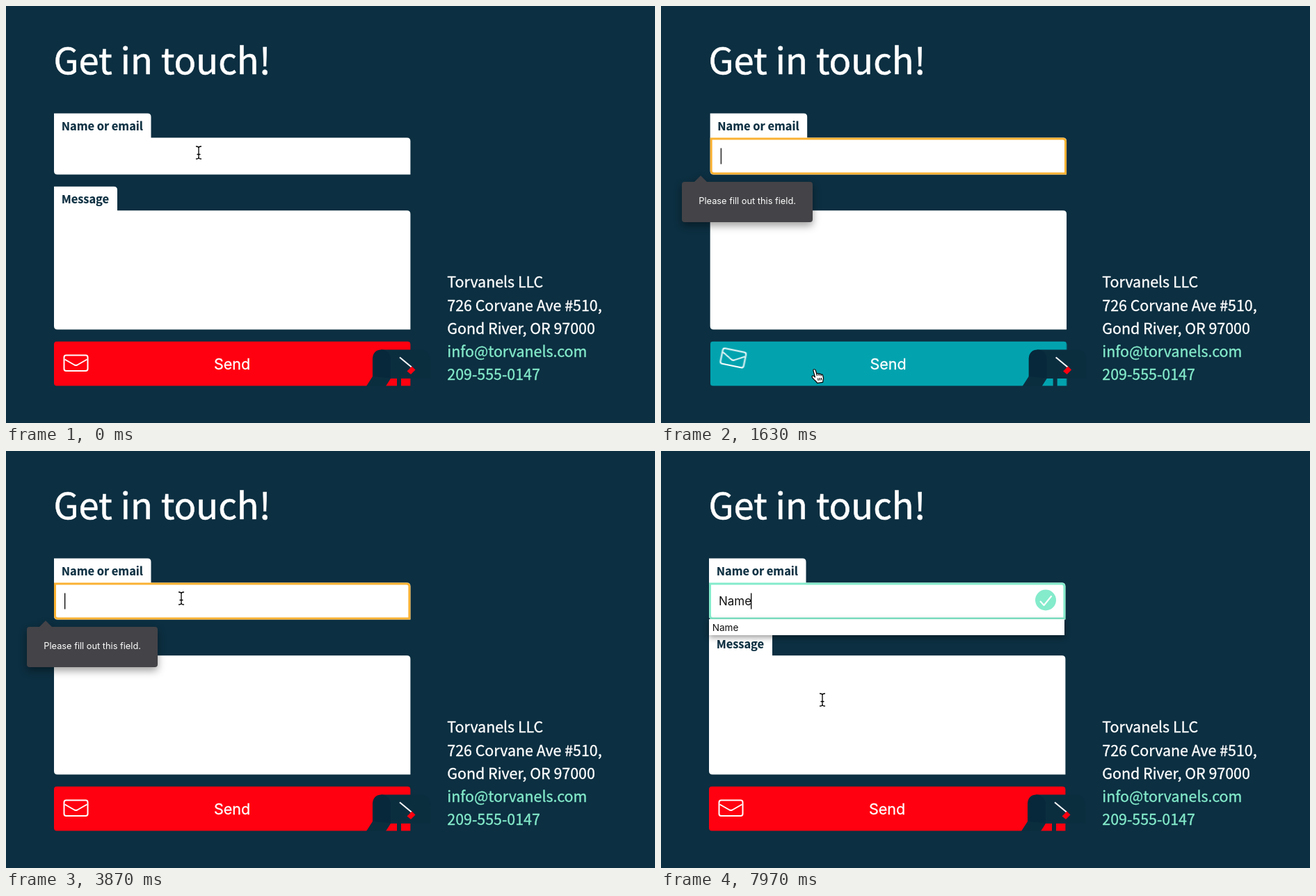
Recreate the animation shown at these times as an HTML page. Size 933 by 600 pixels, loop 8 s.

```html
<!DOCTYPE html>
<html lang="en">
<head>
<meta charset="utf-8">
<title>Contact form</title>
<style>
html, body { margin: 0; width: 100%; height: 100%; overflow: hidden; background: #0c2f41; }
svg { display: block; width: 100vw; height: 100vh; }
text { font-family: "Noto Sans CJK JP", "Noto Sans CJK SC", "Noto Sans", sans-serif; fill: #fff; white-space: pre; }
.title { font-size: 52.4px; stroke: #fff; stroke-width: .6; }
.label { font-size: 16.4px; font-weight: 700; fill: #0c2f41; stroke: #0c2f41; stroke-width: .2; }
.info { font-size: 21.4px; stroke: #fff; stroke-width: .35; }
.link { fill: #84ebcb; stroke: #84ebcb; }
.ui { font-family: Inter, Roboto, sans-serif; }
.send { font-size: 21.5px; text-anchor: middle; stroke: #fff; stroke-width: .3; }
.line { fill: none; stroke: #fff; stroke-width: 2; stroke-linejoin: round; }
.caret { fill: #000; }

/* Every animation shares one 8 s timeline. */
.move, .step { animation: 8s linear infinite; }
.step { animation-timing-function: step-end; }

#form { animation-name: shake; }
@keyframes shake {
  0%, 17.1% { transform: none; }
  17.8%, 18.4% { transform: translateX(1px); }
  19.3% { transform: translateX(-2px); }
  20.3% { transform: translateX(2px); }
  21.3% { transform: translateX(-2px); }
  22.3% { transform: translateX(1px); }
  23.3%, 100% { transform: none; }
}

#button { animation-name: hover; }
@keyframes hover {
  0%, 7.81% { fill: #ff0010; }
  10.5%, 42.29% { fill: #02a3af; }
  44.8%, 100% { fill: #ff0010; }
}

#letter { animation-name: hop; transform-box: fill-box; transform-origin: center; }
@keyframes hop {
  0%, 15% { transform: none; animation-timing-function: ease-out; }
  17.7%, 18.3% { transform: translate(3.2px, -14.5px) rotate(23deg); animation-timing-function: ease-in-out; }
  22.5%, 100% { transform: none; }
}

#focus { animation-name: focus; fill: none; stroke-width: 3; }
@keyframes focus {
  0% { stroke: transparent; }
  17.15% { stroke: #fab131; }
  80.9%, 100% { stroke: #84ebcb; }
}

#blink { animation-name: blink; }
@keyframes blink {
  0%, 23.44%, 35.94%, 48.9%, 60.94%, 73.44%, 80.9%, 100% { opacity: 0; }
  17.19%, 29.69%, 42.19%, 54.69%, 67.19%, 79.69% { opacity: 1; }
}
#blink2 { animation-name: blink2; }
@keyframes blink2 {
  0%, 93.1% { opacity: 0; }
  86.8%, 99.3%, 100% { opacity: 1; }
}

#n, #list { animation-name: key1; }
#a { animation-name: key2; }
#m { animation-name: key3; }
#e { animation-name: key4; }
@keyframes key1 { 0% { fill-opacity: 0; visibility: hidden; } 80.9%, 100% { fill-opacity: 1; visibility: visible; } }
@keyframes key2 { 0% { fill-opacity: 0; } 83.1%, 100% { fill-opacity: 1; } }
@keyframes key3 { 0% { fill-opacity: 0; } 85%, 100% { fill-opacity: 1; } }
@keyframes key4 { 0% { fill-opacity: 0; } 86.8%, 100% { fill-opacity: 1; } }

#list rect { filter: drop-shadow(0 3px 4px rgba(0, 0, 0, .4)); }

#check { animation-name: check; }
@keyframes check {
  0%, 80.9% { opacity: 0; transform: translate(-100px, -1.5px); }
  81%, 82% { opacity: 1; transform: translate(-100px, -1.5px); animation-timing-function: ease-out; }
  86.5%, 100% { opacity: 1; transform: none; }
}

#tip { animation-name: tip; }
#tip path { fill: #444347; filter: drop-shadow(0 5px 6px rgba(0, 0, 0, .38)); }
@keyframes tip {
  0%, 17.1% { opacity: 0; transform: translateY(-2px); }
  17.8%, 18.3% { opacity: .74; transform: translateY(-1px); }
  18.9%, 55% { opacity: 1; transform: none; }
  58.75%, 100% { opacity: 0; transform: none; }
}

#pointer { animation-name: travel; }
@keyframes travel {
  0%, 1.25% { transform: translate(277px, 211px); animation-timing-function: ease-in-out; }
  10%, 29% { transform: translate(221px, 523px); animation-timing-function: ease-in-out; }
  32.4%, 41.25% { transform: translate(218px, 499px); animation-timing-function: ease-in-out; }
  47.5%, 93.13% { transform: translate(252px, 212px); animation-timing-function: ease-out; }
  99.6%, 100% { transform: translate(232px, 358px); }
}
#beam { animation-name: beam; }
@keyframes beam {
  0%, 4.39%, 42.74%, 46.09%, 93.13%, 95.67%, 100% { opacity: 1; }
  3.18%, 7.38%, 45.18%, 80.9%, 93.98% { opacity: 0; }
}
#arrow { animation-name: arrow; }
@keyframes arrow {
  3.18%, 7.38%, 42.29%, 45.18%, 93.98% { opacity: 1; }
  0%, 4.39%, 7.81%, 42.74%, 46.09%, 95.67%, 100% { opacity: 0; }
}
#hand { animation-name: hand; }
@keyframes hand {
  0%, 42.29%, 100% { opacity: 0; }
  7.81% { opacity: 1; }
}
</style>
</head>
<body>
<svg viewBox="0 0 933 600">
  <defs>
    <clipPath id="inside"><rect x="69" y="483" width="512" height="63"/></clipPath>
  </defs>

  <text class="title" x="68.5" y="98">Get in touch!</text>

  <g id="form" class="move">
    <path fill="#fff" d="M69 154.600H203.500Q208.500 154.600 208.500 159.600V189.500H576.400Q581.400 189.500 581.400 194.500V242.500H74Q69 242.500 69 237.500Z"/>
    <path fill="#fff" d="M69 259.700H155Q160 259.700 160 264.700V294.300H576.400Q581.400 294.300 581.400 299.300V465.500H74Q69 465.500 69 460.500Z"/>
    <text class="label" x="79.700" y="178.500">Name or email</text>
    <text class="label" x="79.700" y="283.500">Message</text>

    <path id="focus" class="step" d="M70.500 191H575.900Q579.900 191 579.900 195V241H74.500Q70.500 241 70.500 237Z"/>
    <text class="ui" x="83" y="222.300" font-size="17" style="fill:#111"><tspan id="n" class="step">N</tspan><tspan id="a" class="step">a</tspan><tspan id="m" class="step">m</tspan><tspan id="e" class="step">e</tspan></text>
    <rect id="blink" class="caret step" x="84" y="204.500" width="1.300" height="23"/>
    <rect id="blink2" class="caret step" x="129" y="204.500" width="1.300" height="23"/>
    <g id="check" class="move">
      <circle cx="553" cy="214.500" r="15" fill="#84ebcb"/>
      <path class="line" d="M545 216L550.500 222L561.500 208.500"/>
    </g>

    <path id="button" class="move" d="M73 482.700H577.400Q581.400 482.700 581.400 486.700V546.500H73Q69 546.500 69 542.500V486.700Q69 482.700 73 482.700Z"/>
    <g clip-path="url(#inside)">
      <g id="letter" class="move line">
        <rect x="83.500" y="502.500" width="34" height="22.500" rx="3"/>
        <path d="M84.500 508.500L98.500 516.500Q100.500 517.500 102.500 516.500L116.500 508.500"/>
      </g>
    </g>
    <text class="ui send" x="325" y="523">Send</text>

    <!-- mailbox -->
    <path fill="#0b2e3f" d="M539 494.500H598Q610 496 610 510V536H568V547H562V536H553L546 547H518L527 533Z"/>
    <path fill="#07283a" d="M527 533V507Q528 494.500 540 494.500Q552 495 553 508V535.500Z"/>
    <path class="line" d="M566 505.500L583.500 520"/>
    <path fill="#ff0010" d="M576.500 525.500L583.500 518.500L588.500 523.500L582 530Z"/>
  </g>

  <g class="info">
    <text x="634.300" y="405">Torvanels LLC</text>
    <text x="634.300" y="438.500">726 Corvane Ave #510,</text>
    <text x="634.300" y="471.700">Gond River, OR 97000</text>
    <text class="link" x="634.300" y="504.800">info@torvanels.com</text>
    <text class="link" x="634.300" y="538">209-555-0147</text>
  </g>

  <g id="list" class="step">
    <rect x="69" y="242" width="511" height="23" fill="#fff"/>
    <text class="ui" x="73.700" y="258.500" font-size="13.600" style="fill:#111">Name</text>
  </g>

  <g id="tip" class="move">
    <path d="M34 253H48L57 244L66 253H214Q218 253 218 257V307Q218 311 214 311H34Q30 311 30 307V257Q30 253 34 253Z"/>
    <text class="ui" x="54.300" y="285.200" font-size="12.800">Please fill out this field.</text>
  </g>

  <g id="pointer" class="move">
    <g id="beam" class="step" fill="none" stroke-linecap="round">
      <path stroke="#fff" stroke-width="3" d="M-3.500 -9Q0 -9 0 -6.500Q0 -9 3.500 -9M0 -6.500V6.500M-3.500 9Q0 9 0 6.500Q0 9 3.500 9M-2 2.500H2"/>
      <path stroke="#000" stroke-width="1.300" d="M-3.500 -9Q0 -9 0 -6.500Q0 -9 3.500 -9M0 -6.500V6.500M-3.500 9Q0 9 0 6.500Q0 9 3.500 9M-2 2.500H2"/>
    </g>
    <path id="arrow" class="step" fill="#000" stroke="#fff" stroke-width="1.200" d="M0 0V16L3.700 12.600L6.200 18.400L8.800 17.300L6.300 11.600H11.500Z"/>
    <g id="hand" class="step" stroke="#000" stroke-width="1.200" stroke-linejoin="round">
      <path fill="#fff" d="M-2.200 1.200C-2.200 -.6 .6 -.8 1.200 1L2.800 6.200C3.500 5.300 5.200 5.400 5.800 6.600C6.600 5.700 8.300 6 8.800 7.300C10 6.600 11.400 7.200 11.600 8.600L12.400 12C12.800 14 11.800 15.400 11.600 18.400L3.600 19.600C2.800 17.400 .2 16 -2 13.400C-3.400 11.800 -4.600 10.600 -3.800 9.600C-2.800 8.600 -1.200 9.200 .4 11Z"/>
      <path fill="none" d="M2.800 6.200L3.500 9M5.800 6.600L6.400 9M8.800 7.300L9.300 9.500M4.500 12.500L5.200 16M7 12.200L7.600 15.700M9.400 12L9.900 15.300"/>
    </g>
  </g>
</svg>
</body>
</html>
```
